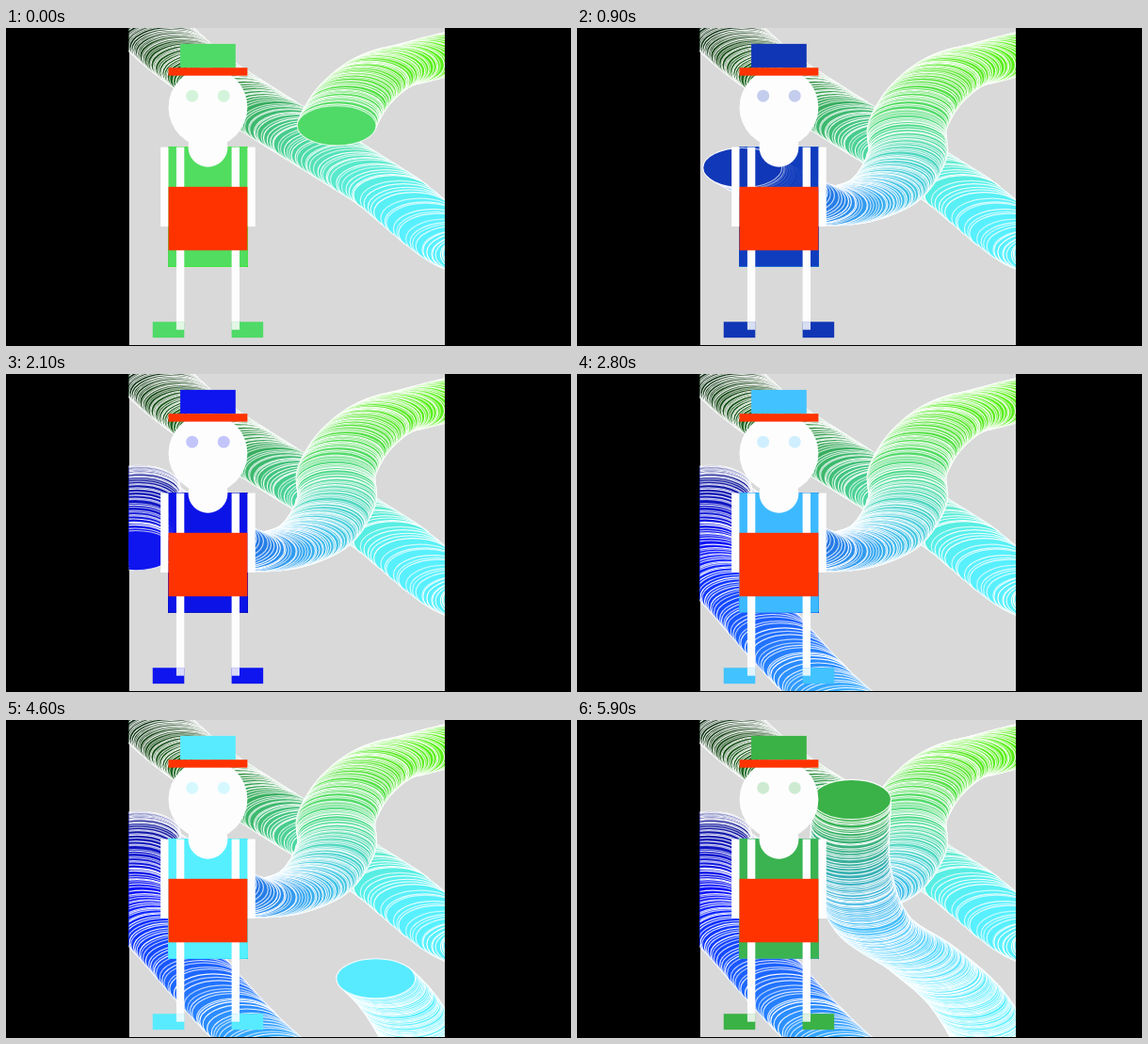
Write an HTML page with a canvas that moves like this. It is 600 by 338 pixels and loops after 6000 ms.

```html
<!DOCTYPE html>
<html lang="en">
<head>
<meta charset="utf-8">
<title>Tube painter</title>
<style>
html, body { margin: 0; width: 100%; height: 100%; overflow: hidden; background: #000; }
canvas { display: block; width: 600px; height: 338px; }
</style>
</head>
<body>
<canvas id="stage" width="600" height="338"></canvas>
<script>
const LOOP = 6000, TICK = 100, STEP = 10;
const RED = '#ff3300', WHITE = '#fdfdfe';

// The sketch is a 400 unit square, fitted into the middle of the stage
function sketchContext(canvas) {
  const ctx = canvas.getContext('2d');
  ctx.setTransform(0.8385, 0, 0, 0.844, 130.6, 0);
  return ctx;
}

const stage = document.getElementById('stage');
const paper = document.createElement('canvas');
paper.width = stage.width;
paper.height = stage.height;
const view = sketchContext(stage);
const ink = sketchContext(paper);
ink.rect(0, 0, 400, 399.3);
ink.clip();

// Key points of the brush: time, x, y; the part before 0 is already painted
const path = [
  [-2700, 5, -20], [-2300, 77, 46], [-1900, 170, 107], [-1480, 321, 201],
  [-1200, 450, 282], [-800, 480, 42], [-460, 347, 47], [-250, 295, 75],
  [0, 263, 123], [180, 262, 163], [400, 227, 209], [640, 152, 222],
  [900, 52, 175], [1300, 14, 149], [1800, 15, 148], [2100, 9, 223],
  [2400, 67, 299], [2700, 170, 408], [2900, 260, 465], [3500, 370, 460],
  [3900, 377, 421], [4400, 338, 351], [4800, 282, 301], [5200, 218, 256],
  [5600, 191, 182], [5900, 192, 98], [6000, 192, 78]
];

const clamp = (v, lo = 0, hi = 1) => Math.max(lo, Math.min(hi, v));
const smooth = v => v * v * (3 - 2 * v);

function noise(i) {
  const s = Math.sin(i * 12.9898) * 43758.5453;
  return s - Math.floor(s);
}

// Cubic curve through the key points
function brushAt(t) {
  let i = 0;
  while (i < path.length - 2 && t >= path[i + 1][0]) i++;
  const a = path[Math.max(i - 1, 0)], b = path[i], c = path[i + 1];
  const d = path[Math.min(i + 2, path.length - 1)];
  const span = c[0] - b[0], u = clamp((t - b[0]) / span);
  const axis = k => {
    const m0 = (c[k] - a[k]) / (c[0] - a[0]) * span;
    const m1 = (d[k] - b[k]) / (d[0] - b[0]) * span;
    const diff = c[k] - b[k];
    return b[k] + u * (m0 + u * (3 * diff - 2 * m0 - m1 + u * (m0 + m1 - 2 * diff)));
  };
  return { x: axis(1), y: axis(2) };
}

// Red and green follow x, blue follows y
function colourAt({ x, y }) {
  const r = clamp(0.3 * x, 14, 88);
  const g = 240 * Math.sin(clamp(x, 20, 360) / 230);
  const b = 20 + 235 * smooth(clamp((y - 30) / 230));
  return `rgb(${[r, g, b].map(Math.round)})`;
}

function box(ctx, colour, x, y, w, h) {
  ctx.fillStyle = colour;
  ctx.fillRect(x, y, w, h);
}

function disc(ctx, colour, x, y, rx, ry = rx) {
  ctx.fillStyle = colour;
  ctx.beginPath();
  ctx.ellipse(x, y, rx, ry, 0, 0, Math.PI * 2);
  ctx.fill();
}

let step, brush;

function clearPaper() {
  step = path[0][0] / STEP;
  brush = brushAt(path[0][0]);
  box(ink, '#d9d9d9', 0, 0, 400, 400);
}

function stamp(i) {
  const p = brushAt((i - noise(i)) * STEP);
  const colour = colourAt(p);
  // A resting brush leaves no further rings
  if (Math.hypot(p.x - brush.x, p.y - brush.y) > 0.8) {
    disc(ink, colour, p.x, p.y, 50, 25);
    ink.strokeStyle = `rgba(255, 255, 255, ${0.6 + 0.4 * noise(i + 0.5)})`;
    ink.lineWidth = 1.4;
    ink.stroke();
    brush = p;
  }
  // The shirt is see-through, so fresh rings fade beneath it
  ink.globalAlpha = 0.28;
  box(ink, colour, 50, 150, 100, 150);
  ink.globalAlpha = 1;
}

function drawFigure(colour) {
  box(view, colour, 65, 20, 70, 30);
  disc(view, WHITE, 100, 100, 50);
  disc(view, WHITE, 100, 150, 25);
  box(view, RED, 50, 50, 100, 10);

  for (const side of [-1, 1]) {
    const strap = side < 0 ? 60 : 130;
    view.globalAlpha = 0.24;
    disc(view, colour, 100 + side * 20, 85.5, 7.7);
    view.globalAlpha = 1;
    box(view, WHITE, 95 + side * 55, 150, 10, 100);
    box(view, colour, 80 + side * 50, 370, 40, 20);
    box(view, WHITE, strap, 150, 10, 220);
    box(view, 'rgba(253, 253, 254, 0.85)', strap, 370, 10, 10);
  }
  box(view, RED, 50, 200, 100, 80);
}

function draw(t) {
  const last = t / STEP;
  if (last < step) clearPaper();
  while (step < last) stamp(++step);

  view.save();
  view.resetTransform();
  view.clearRect(0, 0, stage.width, stage.height);
  view.drawImage(paper, 0, 0);
  view.restore();
  drawFigure(colourAt(brushAt(t)));
}

function frame() {
  draw(Math.floor(performance.now() % LOOP / TICK) * TICK);
  requestAnimationFrame(frame);
}

clearPaper();
frame();
</script>
</body>
</html>
```
